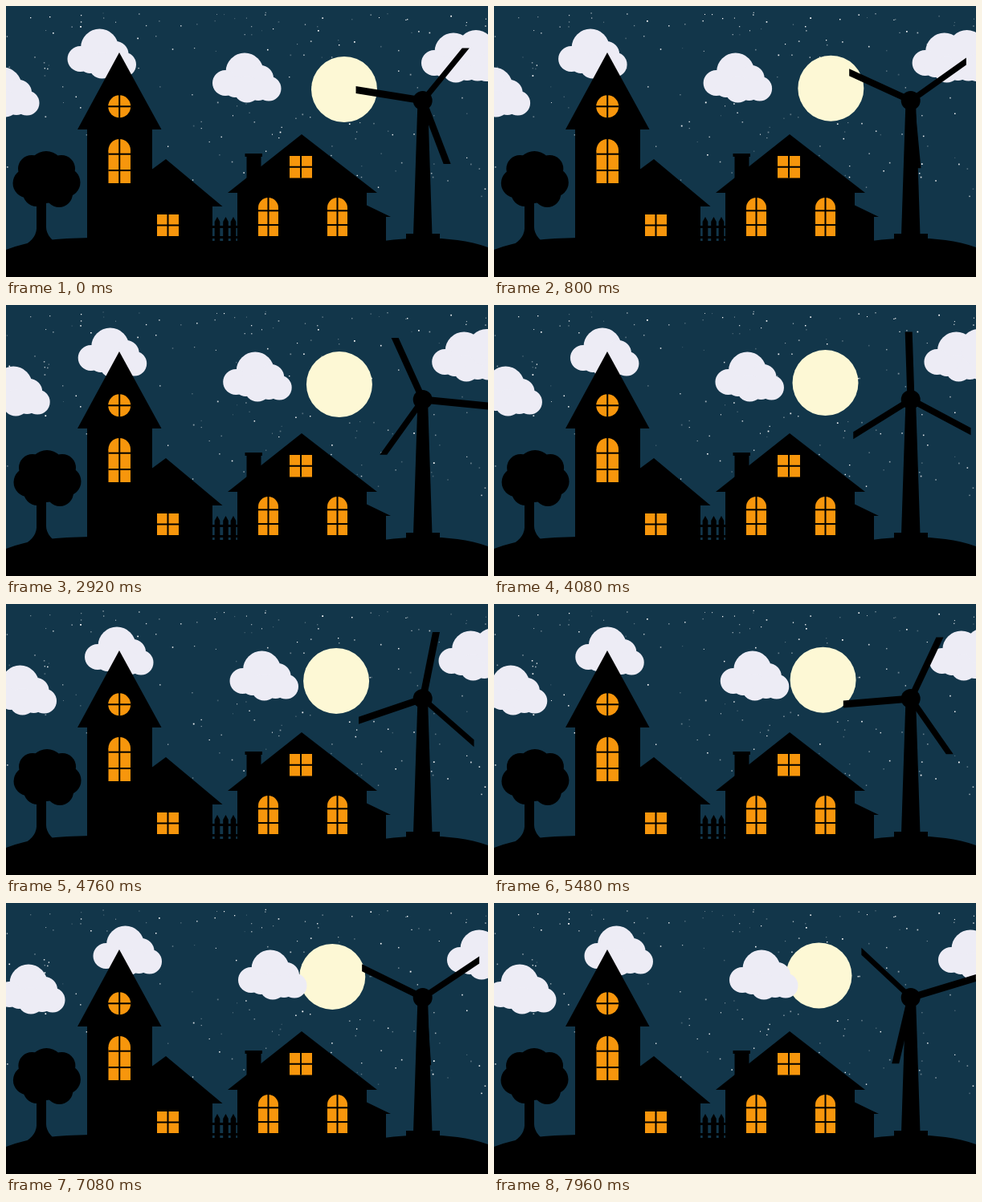
These frames come from a looping animation (600x338 px, 8 s). An HTML page with a canvas:

```html
<!DOCTYPE html>
<html lang="en">
<head>
<meta charset="utf-8">
<title>Night village</title>
<style>
  html, body { margin: 0; width: 100%; height: 100%; overflow: hidden; background: #12364a; }
  canvas { display: block; width: 100%; height: 100%; }
</style>
</head>
<body>
<canvas id="stage" width="600" height="338"></canvas>
<script>
const ctx = document.getElementById('stage').getContext('2d');
const LOOP = 8000;
const SKY = '#12364a', MOON = '#fdf8d5', CLOUD = '#edecf5', GLOW = '#f7960c', BLACK = '#000';

let seed = 7;
function random() {
  seed = (seed * 16807) % 2147483647;
  return seed / 2147483647;
}

const brightStars = [
  [262, 10], [271, 10], [284, 15], [387, 25], [388, 30], [237, 22], [217, 24], [58, 33],
  [190, 18], [186, 37], [30, 14], [93, 11], [54, 13], [430, 16], [464, 14], [499, 16],
  [513, 31], [413, 42], [414, 48], [332, 28], [305, 25], [362, 47]
];
const stars = Array.from({ length: 200 }, (_, i) => {
  const [x, y] = brightStars[i] || [random() * 600, 7 + random() * 231];
  return { x, y, size: 1 + random() * 0.8, phase: random() * 2 * Math.PI, turns: 2 + Math.floor(random() * 5) };
});

// Circles as x, y, radius from the cloud's top left corner
const cloudPuffs = [
  [40, 24, 23.5], [16, 38, 16], [60, 32, 16], [70, 45, 15.5], [43, 46, 16.5], [28, 43, 13], [57, 46, 14]
];
const treePuffs = [
  [50, 218, 28], [50, 203, 22], [32, 203, 17], [69, 203, 17],
  [27, 221, 18.5], [74, 220, 18.5], [38, 233, 17], [66, 234, 17]
];

function circle(x, y, r) {
  ctx.beginPath();
  ctx.arc(x, y, r, 0, 2 * Math.PI);
  ctx.fill();
}

function polygon(...points) {
  ctx.beginPath();
  for (let i = 0; i < points.length; i += 2) ctx.lineTo(points[i], points[i + 1]);
  ctx.fill();
}

function puffs(list, dx, dy) {
  for (const [x, y, r] of list) circle(x + dx, y + dy, r);
}

function drawSky(t) {
  ctx.fillStyle = SKY;
  ctx.fillRect(0, 0, 600, 338);

  ctx.fillStyle = '#fff';
  for (const s of stars) {
    ctx.globalAlpha = 0.6 + 0.4 * Math.sin(s.phase + s.turns * 2 * Math.PI * t / LOOP);
    ctx.fillRect(s.x, s.y, s.size, s.size);
  }
  ctx.globalAlpha = 1;

  ctx.fillStyle = MOON;
  circle(421 - 0.00208 * t, 104 - 0.0017 * t, 41);

  const drift = 0.00452 * t;
  ctx.fillStyle = CLOUD;
  puffs(cloudPuffs, -44 + drift, 76);
  puffs(cloudPuffs, 76.5 + drift, 28);
  puffs(cloudPuffs, 257 + drift, 58);
  puffs(cloudPuffs, 517 + drift, 33);
  circle(585 + drift, 53, 23);
  circle(598 + drift, 77, 17);
}

function drawTree(t) {
  ctx.fillStyle = BLACK;
  puffs(treePuffs, 1.1 * Math.sin(Math.PI * t / LOOP), 0);
  ctx.beginPath();
  ctx.moveTo(38, 240);
  ctx.lineTo(38, 278);
  ctx.quadraticCurveTo(37, 292, 18, 301);
  ctx.lineTo(70, 301);
  ctx.quadraticCurveTo(50, 289, 50, 276);
  ctx.lineTo(50, 240);
  ctx.fill();
}

function drawGround() {
  ctx.beginPath();
  ctx.moveTo(0, 304);
  ctx.bezierCurveTo(30, 292, 65, 290, 105, 289);
  ctx.lineTo(105, 293);
  ctx.lineTo(470, 293);
  ctx.bezierCurveTo(510, 288, 560, 287, 600, 301);
  ctx.lineTo(600, 338);
  ctx.lineTo(0, 338);
  ctx.fill();
}

function drawBuildings() {
  // Tower and its annex
  polygon(141, 58, 193.5, 154, 89, 154);
  ctx.fillRect(101, 153, 81, 145);
  polygon(199, 191, 269.5, 250, 257, 250, 257, 296, 180, 296, 180, 205);

  // Fence
  for (const x of [263, 273.5, 283]) polygon(x - 3.3, 296, x - 3.3, 269, x, 263, x + 3.3, 269, x + 3.3, 296);
  ctx.fillRect(257, 274, 31, 3);
  ctx.fillRect(257, 287, 31, 3);

  // Cottage with chimney and lean-to
  polygon(368, 160, 462, 233, 276, 233);
  ctx.fillRect(288, 232, 161, 65);
  ctx.fillRect(297.5, 184, 21.5, 4);
  ctx.fillRect(299.5, 187, 18, 35);
  polygon(448, 248, 479, 263, 473, 263, 473, 296, 448, 296);
}

function bars(x, y, w, h, rows) {
  ctx.fillStyle = BLACK;
  ctx.fillRect(x + w / 2 - 1, y, 2, h);
  for (const row of rows) ctx.fillRect(x, y + h * row - 1, w, 2);
}

function squareWindow(x, y, w, h) {
  ctx.fillStyle = GLOW;
  ctx.fillRect(x, y, w, h);
  bars(x, y, w, h, [0.5]);
}

function archedWindow(x, y, w, h) {
  const r = w / 2;
  ctx.fillStyle = GLOW;
  circle(x + r, y + r, r);
  ctx.fillRect(x, y + r, w, h - r);
  bars(x, y, w, h, [0.34, 0.71]);
}

function drawWindows() {
  ctx.fillStyle = GLOW;
  circle(141.2, 125.3, 14);
  bars(127, 111, 28.4, 28.6, [0.5]);
  archedWindow(127.5, 166, 27.5, 55);
  squareWindow(188, 260, 27, 27);
  squareWindow(353, 187, 28, 27.5);
  archedWindow(314, 239, 25, 48);
  archedWindow(400, 239, 25, 48);
}

// The blade ends are cut square to the screen axis they lean towards
function blade(angle) {
  const x = 519, y = 118, half = 4.5;
  const endX = x + 84.5 * Math.cos(angle), endY = y + 84.5 * Math.sin(angle);
  const flat = Math.abs(endX - x) > Math.abs(endY - y);
  const dx = flat ? 0 : half, dy = flat ? half : 0;
  polygon(x - dx, y - dy, endX - dx, endY - dy, endX + dx, endY + dy, x + dx, y + dy);
}

function drawWindmill(t) {
  ctx.fillStyle = BLACK;
  polygon(512.5, 118, 525, 118, 530.5, 286, 507, 286);
  ctx.fillRect(498, 284, 42, 10);
  const angle = (-50.9 + 120 * t / 6200) * Math.PI / 180;
  for (let i = 0; i < 3; i++) blade(angle + i * 2 * Math.PI / 3);
  circle(518.7, 118, 12);
}

function draw(now) {
  const t = now % LOOP;
  drawSky(t);
  drawTree(t);
  drawGround();
  drawBuildings();
  drawWindows();
  drawWindmill(t);
  requestAnimationFrame(draw);
}
requestAnimationFrame(draw);
</script>
</body>
</html>
```
